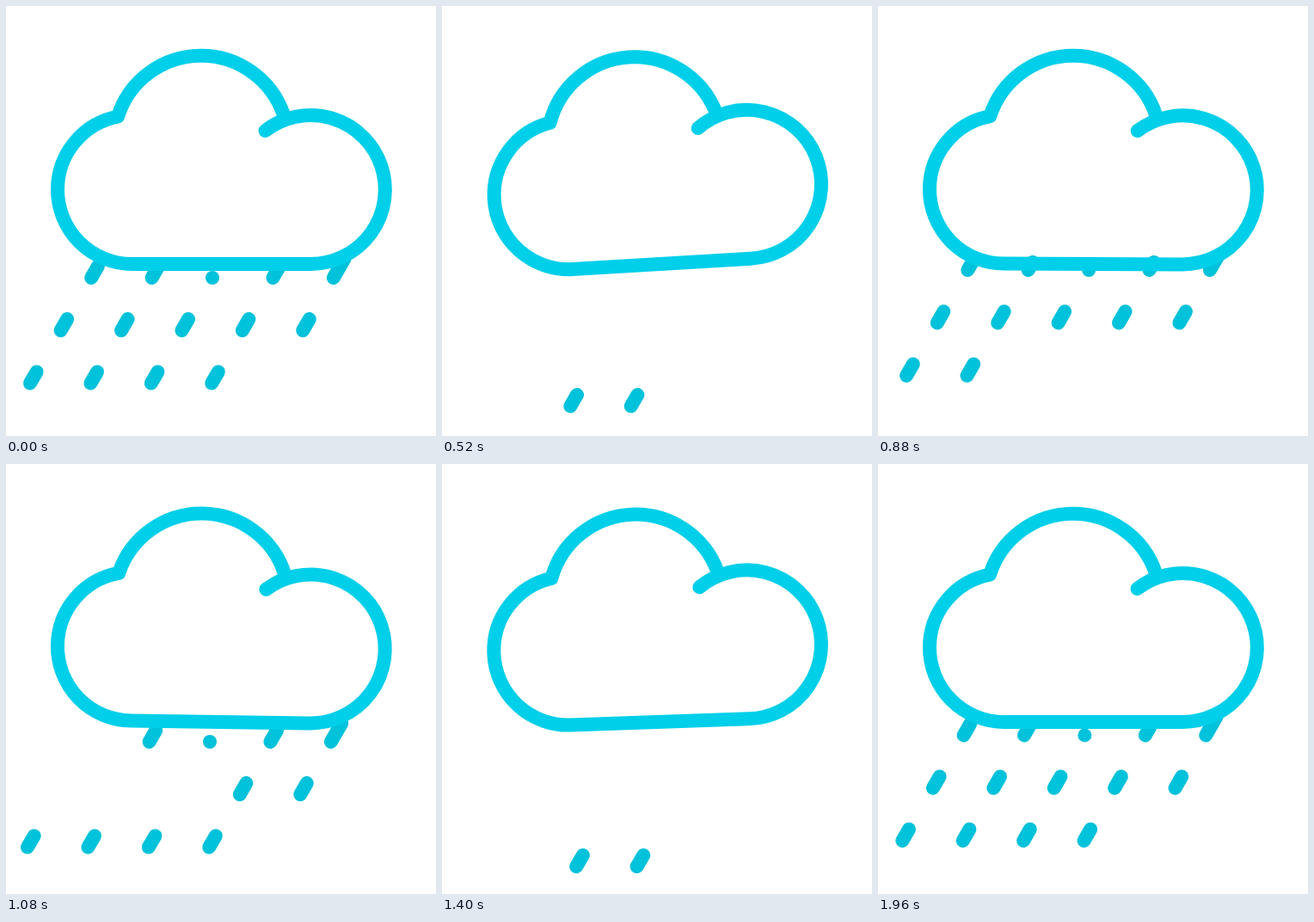
Animation, 500 px wide and 500 px high, one loop 2 s. Source, as an HTML page:

```html
<!DOCTYPE html>
<html lang="en">
<head>
<meta charset="utf-8">
<title>Rain cloud</title>
<style>
html, body { margin: 0; width: 100%; height: 100%; overflow: hidden; background: #fff; }
svg { display: block; width: 100vw; height: 100vh; }
path, line { fill: none; stroke-width: 16; stroke-linecap: round; stroke-linejoin: round; }
#cloud { stroke: #00cfe9; }
#rain { stroke: #00c2da; }
</style>
</head>
<body>
<svg viewBox="0 0 500 500">
  <g id="rain"></g>
  <path id="cloud" d="M323 127A101.5 101.5 0 0 0 130 128.6A86.5 86.5 0 0 0 60 213.5A86.5 86.5 0 0 0 146.5 300H353.5A86.5 86.5 0 1 0 301.5 145"/>
</svg>
<script>
const LOOP = 2000, STEP = 40;
const PITCH = 61.3, GAP = 70.4, SLOPE = 0.577, GUST = 0.15;
const DROP = 13.2, TRIM = 3;
const TOP_ROW = [DROP, DROP, 0, DROP, 21.5];
const ROW_DELAY = [1.6, 0, 4];

// [time, degrees] and [time, fall distance]
const sway = [[0, 0], [400, -3.8], [1040, 0.9], [1400, -2], [1680, 0], [2000, 0]];
const fall = [[0, 0], [320, 14.5], [680, 36.5], [1080, 68.3], [1400, 90.8],
              [1680, 100.3], [1960, 122]];

const linear = k => k;
const sine = k => 0.5 - 0.5 * Math.cos(Math.PI * k);

function at(keys, t, ease) {
  let i = 1;
  while (i < keys.length - 1 && t > keys[i][0]) i++;
  const [t0, a] = keys[i - 1], [t1, b] = keys[i];
  return a + (b - a) * ease((t - t0) / (t1 - t0));
}

const cloud = document.getElementById("cloud");
const rain = document.getElementById("rain");

// Drops go and come in three bursts, ordered by column and row.
function makeDrop(row, col) {
  const rank = col + ROW_DELAY[row];
  const burst = (rank > 2) + (rank > 5.8);
  const line = document.createElementNS("http://www.w3.org/2000/svg", "line");
  rain.appendChild(line);
  return {
    line, row,
    x: 99.2 + col * GAP - row * 35.6,
    y: 316 + row * PITCH,
    top: row ? 0 : 300 - 2 * (col - 2) ** 2,
    full: row ? DROP : TOP_ROW[col],
    death: 4.4 + 1.2 * rank + 12.2 * burst,
    birth: 30 + 0.9 * rank + 9 * burst
  };
}

const drops = [];
for (let row = 0; row < 3; row++) {
  for (let col = 0; col < (row < 2 ? 5 : 4); col++) drops.push(makeDrop(row, col));
}

function placeDrop(drop, phase, wave) {
  const leaving = phase < drop.death;
  const shift = leaving ? phase : phase - PITCH;
  const lean = SLOPE + (leaving ? (wave ? -GUST : GUST) : 0);
  const x = drop.x - shift * lean, y = drop.y + shift;
  const age = leaving ? drop.death - phase : phase - drop.birth;
  const len = Math.min(drop.full, age * TRIM, y - drop.top);
  const shown = len >= 0;
  drop.line.style.display = shown ? "" : "none";
  if (!shown) return;
  drop.line.setAttribute("x1", x);
  drop.line.setAttribute("y1", y);
  drop.line.setAttribute("x2", x + len * SLOPE + 0.01);
  drop.line.setAttribute("y2", y - len);
}

function draw(time) {
  const t = Math.floor((time % LOOP) / STEP) * STEP;
  cloud.setAttribute("transform", `rotate(${at(sway, t, sine)} 250 207)`);
  const fallen = at(fall, t, linear);
  const wave = Math.floor(fallen / PITCH);
  drops.forEach(d => placeDrop(d, fallen % PITCH, wave));
}

let start;
function tick(now) {
  if (start === undefined) start = now;
  draw(now - start);
  requestAnimationFrame(tick);
}
draw(0);
requestAnimationFrame(tick);
</script>
</body>
</html>
```
